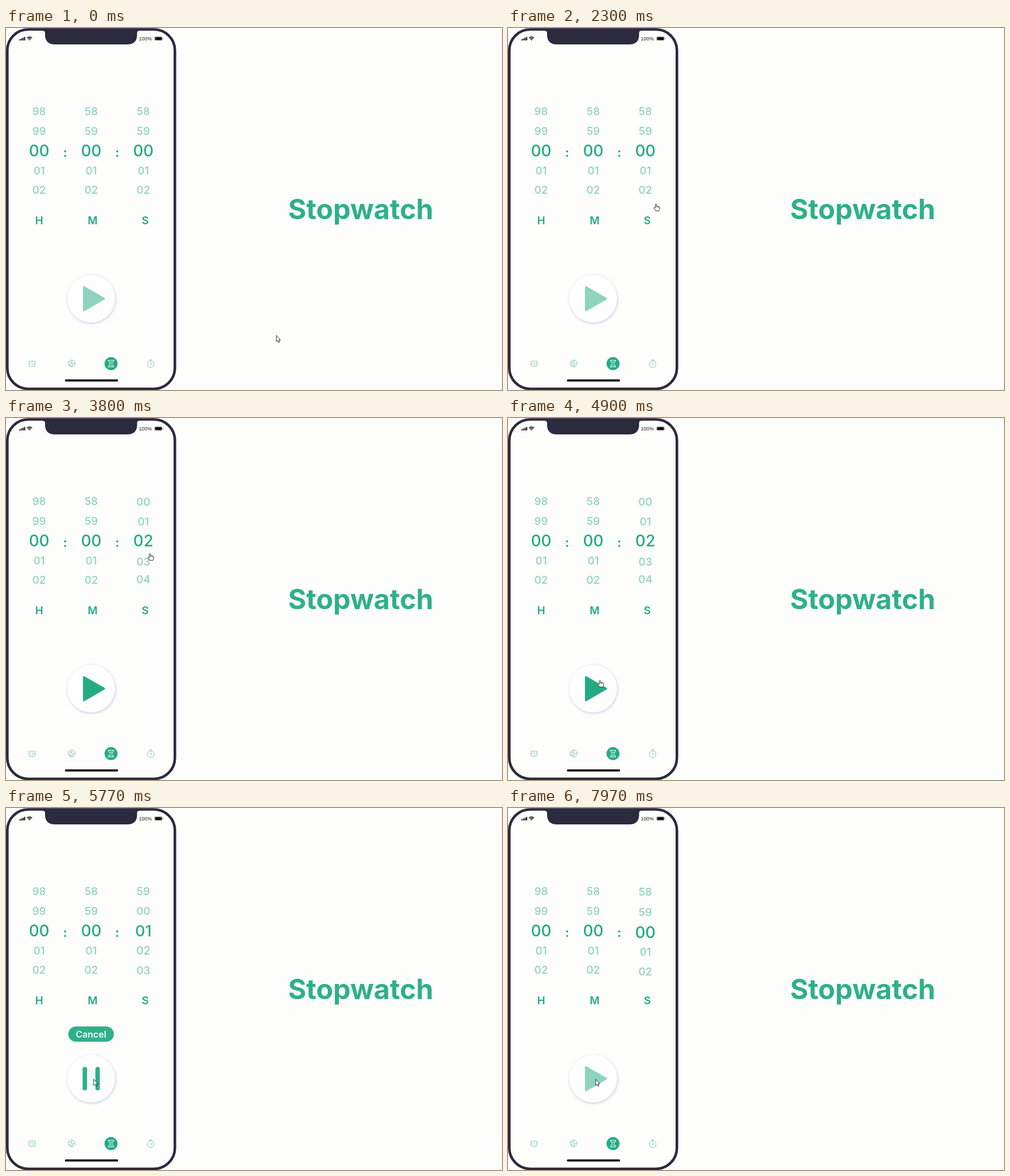
Write an HTML page with a canvas that moves like this. It is 876x640 px and loops after 8 s.

```html
<!DOCTYPE html>
<html lang="en">
<head>
<meta charset="utf-8">
<title>Stopwatch</title>
<style>
html, body { margin: 0; width: 100%; height: 100%; overflow: hidden; background: #fdfdfc; }
canvas { display: block; width: 876px; height: 640px; }
</style>
</head>
<body>
<canvas id="stage" width="876" height="640"></canvas>
<script>
const ctx = document.getElementById('stage').getContext('2d');
const LOOP = 8000;
const BG = '#fdfdfc', GREEN = '#24ab84', FRAME = '#2b2a3e';
const DEEP = [36, 171, 132], PALE = [142, 211, 190];

const clamp = v => Math.max(0, Math.min(1, v));
const mix = (a, b, p) => a + (b - a) * p;
const ease = p => p < .5 ? 2 * p * p : 1 - 2 * (1 - p) * (1 - p);
const span = (t, from, to) => ease(clamp((t - from) / (to - from)));
const shade = p => `rgb(${PALE.map((c, i) => Math.round(mix(c, DEEP[i], p))).join()})`;

// Resting wheel positions: centred value and the y of its five slots.
const REST = [
  { value: 0, slots: [147.5, 182, 217, 252, 286] },
  { value: 2, slots: [148.5, 183, 217, 254, 285.5] },
  { value: 1, slots: [148.5, 183.5, 219, 254, 289] },
  { value: 0, slots: [148.5, 184, 219.5, 254, 289] }
];
const MOVES = [[3000, 3720], [5100, 5900], [6900, 7700]];
const HAND_TIMES = [[1480, 2950], [3720, 4060], [4560, 5100], [5900, 6900]];
const POINTER = [
  [300, 477.5, 543.5], [1550, 256, 309.5], [2700, 256, 309.5],
  [3340, 251.5, 251.5], [3600, 249, 238], [3950, 249, 238],
  [4700, 157, 462], [5150, 157, 462], [5500, 154.8, 479.5]
];

function text(str, x, y, size, weight, color, align = 'center') {
  ctx.font = `${weight} ${size}px Inter, sans-serif`;
  ctx.textAlign = align;
  ctx.fillStyle = color;
  ctx.fillText(str, x, y);
}

function box(x, y, w, h, r, color) {
  ctx.beginPath();
  ctx.roundRect(x, y, w, h, r);
  ctx.fillStyle = color;
  ctx.fill();
}

function disc(x, y, r, color) {
  ctx.beginPath();
  ctx.arc(x, y, r, 0, Math.PI * 2);
  ctx.fillStyle = color;
  ctx.fill();
}

function outline(d, color, width = 1) {
  ctx.strokeStyle = color;
  ctx.lineWidth = width;
  ctx.stroke(new Path2D(d));
}

function at(x, y, draw) {
  ctx.save();
  ctx.translate(x, y);
  draw();
  ctx.restore();
}

function faded(alpha, draw) {
  if (alpha <= 0) return;
  ctx.save();
  ctx.globalAlpha = alpha;
  draw();
  ctx.restore();
}

function phone() {
  ctx.beginPath();
  ctx.roundRect(2.3, 2.5, 296, 635.5, 37);
  ctx.strokeStyle = FRAME;
  ctx.lineWidth = 4.6;
  ctx.stroke();
  ctx.fillStyle = FRAME;
  ctx.fill(new Path2D('M65 2H235V5Q231.5 5 231.5 9V12Q231.5 29 214 29H86.5Q69 29 69 12V9Q69 5 65 5Z'));

  for (let i = 0; i < 4; i++) box(23.5 + i * 2.8, 20 - i * 1.4, 2, 2 + i * 1.4, .4, '#111');
  at(41.5, 21.5, () => {
    outline('M-4.6 -3.8Q0 -7.8 4.6 -3.8M-2.8 -2Q0 -4.4 2.8 -2', '#111', 1.4);
    disc(0, -.7, 1.1, '#111');
  });
  ctx.font = '9px "Liberation Sans", Arial, sans-serif';
  ctx.textAlign = 'right';
  ctx.fillStyle = '#222';
  ctx.fillText('100%', 257.5, 21.5);
  ctx.beginPath();
  ctx.roundRect(262.5, 15.5, 13.5, 6.5, 1.6);
  ctx.strokeStyle = '#777';
  ctx.lineWidth = .7;
  ctx.stroke();
  box(263.4, 16.3, 11.7, 4.9, .8, '#000');
  box(276.8, 17.5, 1, 2.5, .5, '#777');
  box(104, 621.2, 94, 3.8, 1.9, '#050505');
}

function tabs() {
  const soft = '#79c9b0';
  at(46, 593, () => {
    outline('M5 .5A5 5 0 1 1 -5 .5A5 5 0 1 1 5 .5M0 -2.5V1L2 2.5M-6.5 -2L-4 -5M6.5 -2L4 -5M-3.5 4.5L-5.5 6M3.5 4.5L5.5 6M-7 1H-5M7 1H5', soft);
  });
  at(116, 593, () => {
    outline('M6 0A6 6 0 1 1 -6 0A6 6 0 1 1 6 0M-5 -3L-1 -1L1 -5.5M-1 -1L1.5 1L5.5 -1M1.5 1L0 6M-5.5 2L-2 2.5L-3 5', soft);
  });
  at(185.5, 593.3, () => {
    disc(0, 0, 11.5, GREEN);
    outline('M-5.5 -5.8H5.5M-5.5 5.8H5.5M-4.3 -5.5Q-4 -2 -1 0Q-4 2 -4.3 5.5M4.3 -5.5Q4 -2 1 0Q4 2 4.3 5.5M-2.2 -2.5H2.2M-2.2 4L0 2.4L2.2 4', '#fff');
  });
  at(255.5, 594.5, () => {
    outline('M5.8 0A5.8 5.8 0 1 1 -5.8 0A5.8 5.8 0 1 1 5.8 0M0 -5.8V-7.8M-2.2 -7.8H2.2M0 .5V-2.5M0 .5L2 -1M4.5 -5L5.5 -6', soft);
  });
}

// One number of a wheel; focus runs from 0 (pale) to 1 (selected).
function number(n, x, y, focus) {
  const size = mix(19, 28, focus);
  text(String(n).padStart(2, '0'), x, y + size * .364, size, 500, shade(focus));
}

function slotY(rest, k) {
  const near = Math.max(-2, Math.min(2, k));
  return rest.slots[near + 2] + (k - near) * 35;
}

function wheel(x, max, from, to, p) {
  ctx.save();
  ctx.beginPath();
  ctx.rect(x - 30, 135, 60, 168);
  ctx.clip();
  for (let v = -4; v <= 6; v++) {
    const a = v - from.value, b = v - to.value;
    const y = mix(slotY(from, a), slotY(to, b), p);
    number((v + max) % max, x, y, mix(a === 0, b === 0, p));
  }
  ctx.restore();
}

function playIcon(color) {
  const d = new Path2D('M137.7 458.3L173 478.5L137.7 499Z');
  ctx.lineJoin = 'round';
  ctx.lineWidth = 3.6;
  ctx.fillStyle = ctx.strokeStyle = color;
  ctx.fill(d);
  ctx.stroke(d);
}

function controls(ready, run, done) {
  ctx.save();
  ctx.shadowColor = 'rgba(85, 85, 165, .32)';
  ctx.shadowBlur = 4;
  ctx.shadowOffsetX = .7;
  ctx.shadowOffsetY = 1.4;
  disc(150.5, 478.5, 42.3, '#fefefe');
  ctx.restore();

  faded(1 - run, () => playIcon(shade(ready)));
  faded(done, () => playIcon(shade(0)));
  faded(run * (1 - done), () => {
    box(135.3, 457.7, 7.8, 41.5, 3.9, GREEN);
    box(157.9, 457.7, 7.8, 41.5, 3.9, GREEN);
    box(110, 386.3, 80.5, 27, 13.5, GREEN);
    text('Cancel', 150.2, 405.6, 16, 600, '#fff');
  });
}

function pointer(t) {
  let [, x, y] = POINTER[0];
  for (let i = 1; i < POINTER.length; i++) {
    const [t0, x0, y0] = POINTER[i - 1], [t1, x1, y1] = POINTER[i];
    if (t < t0) break;
    const p = span(t, t0, t1);
    x = mix(x0, x1, p);
    y = mix(y0, y1, p);
  }
  const hand = HAND_TIMES.some(([a, b]) => t >= a && t < b);
  at(x, y, () => {
    if (hand) ctx.translate(5.3, 1.3);
    const d = new Path2D(hand
      ? 'M-1 1Q0 -.8 1 1V4L3.4 4.3L5 4.8L6.5 6V9.5L5.3 12.5H-.5L-1.5 10.5L-4 7.3Q-3.5 5.4 -1 7.4Z'
      : 'M0 0V11L2.5 8.8L4.2 12.6L5.9 11.8L4.3 8.2H7.4Z');
    ctx.fillStyle = '#fff';
    ctx.fill(d);
    ctx.strokeStyle = '#1c1c1c';
    ctx.lineWidth = .9;
    ctx.lineJoin = 'round';
    ctx.stroke(d);
    if (hand) outline('M1.2 4V6.5M3.2 4.5V6.8M4.9 5V7', '#1c1c1c', .6);
  });
}

function draw(t) {
  ctx.fillStyle = BG;
  ctx.fillRect(0, 0, 876, 640);
  phone();

  const [ready, run, done] = MOVES.map(m => span(t, ...m));
  const step = done > 0 ? 2 : run > 0 ? 1 : 0;
  wheel(58.5, 100, REST[0], REST[0], 0);
  wheel(150.5, 60, REST[0], REST[0], 0);
  wheel(242.5, 60, REST[step], REST[step + 1], [ready, run, done][step]);

  for (const x of [104.3, 196.5]) text(':', x, 227.5, 22, 700, GREEN);
  [['H', 58.5], ['M', 153], ['S', 246]].forEach(([s, x]) => text(s, x, 346.5, 19, 600, GREEN));
  text('Stopwatch', 626.5, 338, 49, 700, '#2eb089');

  controls(ready, run, done);
  tabs();
  pointer(t);
}

function tick(now) {
  draw(now % LOOP);
  requestAnimationFrame(tick);
}
draw(0);
requestAnimationFrame(tick);
</script>
</body>
</html>
```
